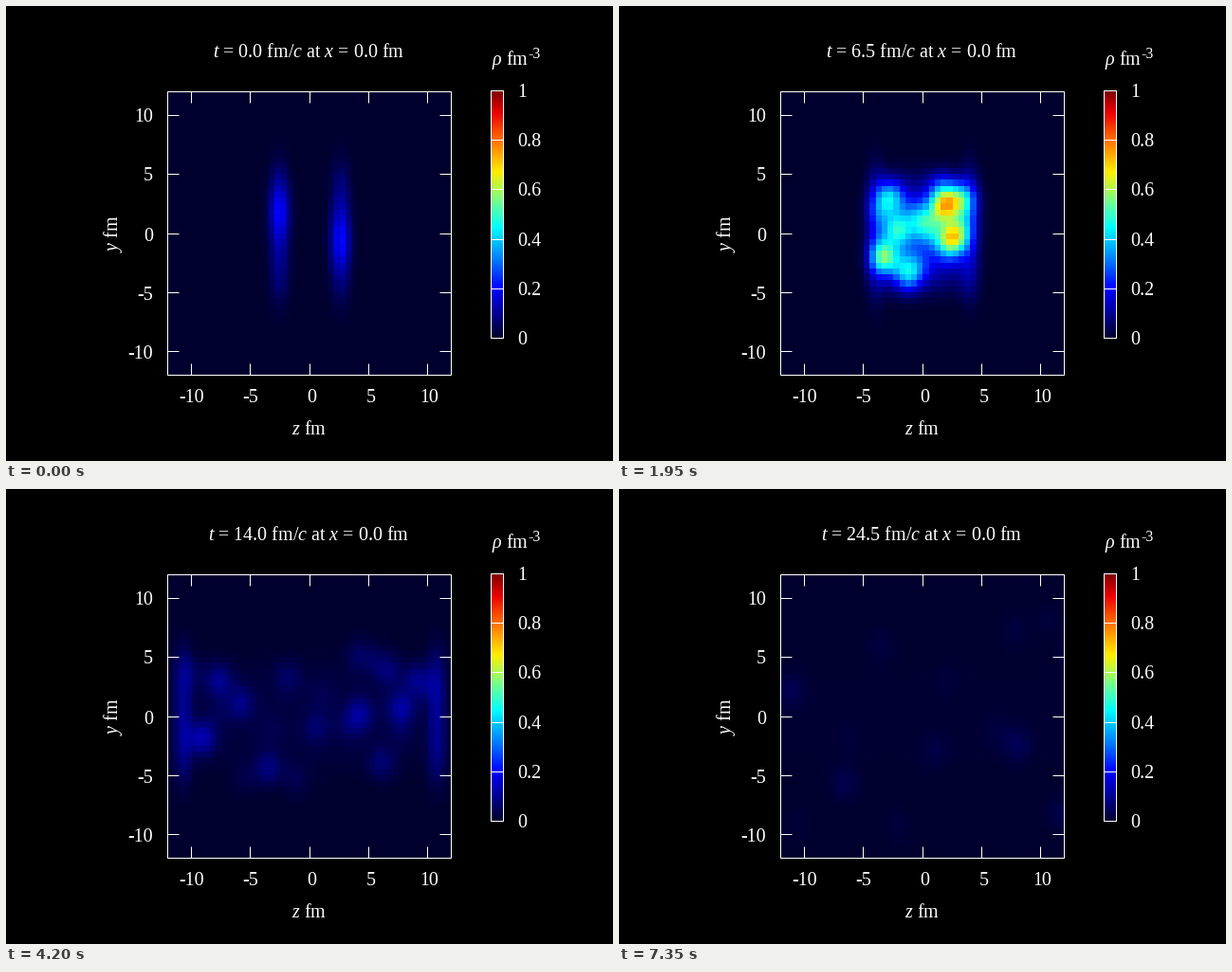
Write a matplotlib script that moves like this. It is 640 px wide and 480 px high and loops after 7500 ms.

```python
import numpy as np
import matplotlib.pyplot as plt
from matplotlib.animation import FuncAnimation
from matplotlib.colors import LinearSegmentedColormap
from matplotlib.patches import Rectangle

DPI, FRAMES, STEP = 100, 50, 0.5
PIXEL = 72 / DPI
LEFT, RIGHT, TOP, BOTTOM = 170.5, 469.5, 90.5, 389.5
BAR = (511.5, 524.5, 89.5, 350.5)
T_HIT = 2.5      # time of full overlap
T_SOURCE = 2.3   # time at which all fragments leave z = 0

plt.rcParams.update({
    "font.family": "Liberation Serif",
    "mathtext.fontset": "custom",
    "mathtext.rm": "Liberation Serif",
    "mathtext.it": "Liberation Serif:italic",
})

palette = LinearSegmentedColormap.from_list("density", [
    (0, "#00002e"), (0.2, "#0000ff"), (0.32, "#0080ff"), (0.45, "#00ffff"),
    (0.56, "#80ff80"), (0.67, "#ffee00"), (0.8, "#ff7000"),
    (0.91, "#ee0000"), (1, "#7f0000")], N=512)

# Main fragments: z speed, y at t = 12, y speed, strength
fragments = [
    (-.78, -1.9, .02, .42), (-.66, 3.0, .0, .31), (-.50, .9, .10, .26),
    (-.30, -4.2, -.12, .26), (-.16, 2.8, .25, .15), (.05, -.5, -.2, .17),
    (.36, .7, -.25, .30), (.35, 4.8, .2, .15), (.57, 3.5, .15, .20),
    (.52, -3.2, -.4, .21), (.66, .5, .1, .36), (.78, 3.0, .03, .28)]

# Faint wisps that fill the space between them
rng = np.random.default_rng(5)
for vz in np.linspace(-.85, .85, 10):
    vy = rng.uniform(-.4, .4)
    fragments.append((vz, 13 * vy, vy, rng.uniform(.06, .12)))

cells = np.arange(-11.75, 12, 0.5)
Z, Y = np.meshgrid(cells, cells)


def blob(z, y, sz, sy, pz=2, py=2):
    return np.exp(-0.5 * (np.abs((Z - z) / sz) ** pz
                          + np.abs((Y - y) / sy) ** py))


def density(t):
    dt = t - T_HIT
    flash = np.exp(-(dt / (1.2 if dt < 0 else 2)) ** 2)
    edge = .35 + .9 * abs(dt)

    # The two nuclei: flat sheets that meet, light up and pass through
    total = np.zeros_like(Z)
    for side in (-1, 1):
        z = side * edge
        total += (.09 + flash) * blob(z, .1, .55 + .25 * flash, 4.74, py=3.7)
        if dt < 0:
            total += .11 * blob(z, .6 - 1.2 * side, .6, 1.7)
    if dt <= 0:
        return total

    # Hot zone between the sheets, thinning out as it grows
    born = 1 - flash
    total += born * .14 * (4 / dt) ** 2 * blob(0, 0, .85 * edge, 4, 4, 4)
    thin = born * (4.5 / (t - 2)) ** 1.3
    for vz, y, vy, a in fragments:
        total += a * thin * blob(vz * (t - T_SOURCE), y + vy * (t - 12), .8, 1)
    return total


def px(z):
    return LEFT + (z + 12) / 24 * (RIGHT - LEFT)


def py(y):
    return BOTTOM - (y + 12) / 24 * (BOTTOM - TOP)


fig = plt.figure(figsize=(640 / DPI, 480 / DPI), dpi=DPI, facecolor="black")
ax = fig.add_axes([0, 0, 1, 1])
ax.axis("off")


def label(x, y, text, ha="center", size=20, **kw):
    return ax.text(x, y, text, color="white", ha=ha, va="baseline",
                   fontsize=size * PIXEL, **kw)


def line(x0, y0, x1, y1):
    ax.plot([x0, x1], [y0, y1], color="white", lw=PIXEL, snap=False,
            solid_capstyle="butt", zorder=3)


def box(x0, x1, y0, y1):
    ax.add_patch(Rectangle((x0, y0), x1 - x0, y1 - y0, fill=False,
                           ec="white", lw=PIXEL, snap=False, zorder=4))


def picture(data, extent):
    return ax.imshow(data, cmap=palette, vmin=0, vmax=1, origin="lower",
                     extent=extent, aspect="auto", interpolation="nearest")


field = picture(density(0), (LEFT, RIGHT, BOTTOM, TOP))
b0, b1, btop, bbot = BAR
picture(np.linspace(0, 1, 260)[:, None], (b0, b1, bbot, btop))
ax.set_xlim(0, 640)
ax.set_ylim(480, 0)
box(LEFT, RIGHT, TOP, BOTTOM)
box(*BAR)

for v in range(-10, 11, 5):
    x, y = np.floor(px(v)) + .5, np.floor(py(v)) + .5
    line(x, TOP, x, TOP + 12)
    line(x, BOTTOM, x, BOTTOM - 12)
    line(LEFT, y, LEFT + 12, y)
    line(RIGHT, y, RIGHT - 12, y)
    label(x + (2 if v >= 0 else 0), 418, str(v))
    label(155, y + 7, str(v), "right")

for v in np.arange(6) / 5:
    y = np.floor(bbot - v * (bbot - btop)) + .5
    line(b0, y, b1, y)
    label(539, y + 6.5, f"{v:g}", "left")

label(319.5, 452, r"$\mathit{z}$ fm")
label(118, 240, r"$\mathit{y}$ fm", rotation=90, rotation_mode="anchor")
label(511.5, 62, r"$\mathit{\rho}$ fm", "left")
label(550, 55, "-3", "left", 16)
title = label(319, 54, "")


def draw(i):
    t = i * STEP
    field.set_data(density(t))
    title.set_text(rf"$\mathit{{t}}$ = {t:.1f} fm/$\mathit{{c}}$ at "
                   r"$\mathit{x}$ = 0.0 fm")
    return field, title


anim = FuncAnimation(fig, draw, frames=FRAMES, interval=150, repeat=True,
                     repeat_delay=0)
plt.show()
```
